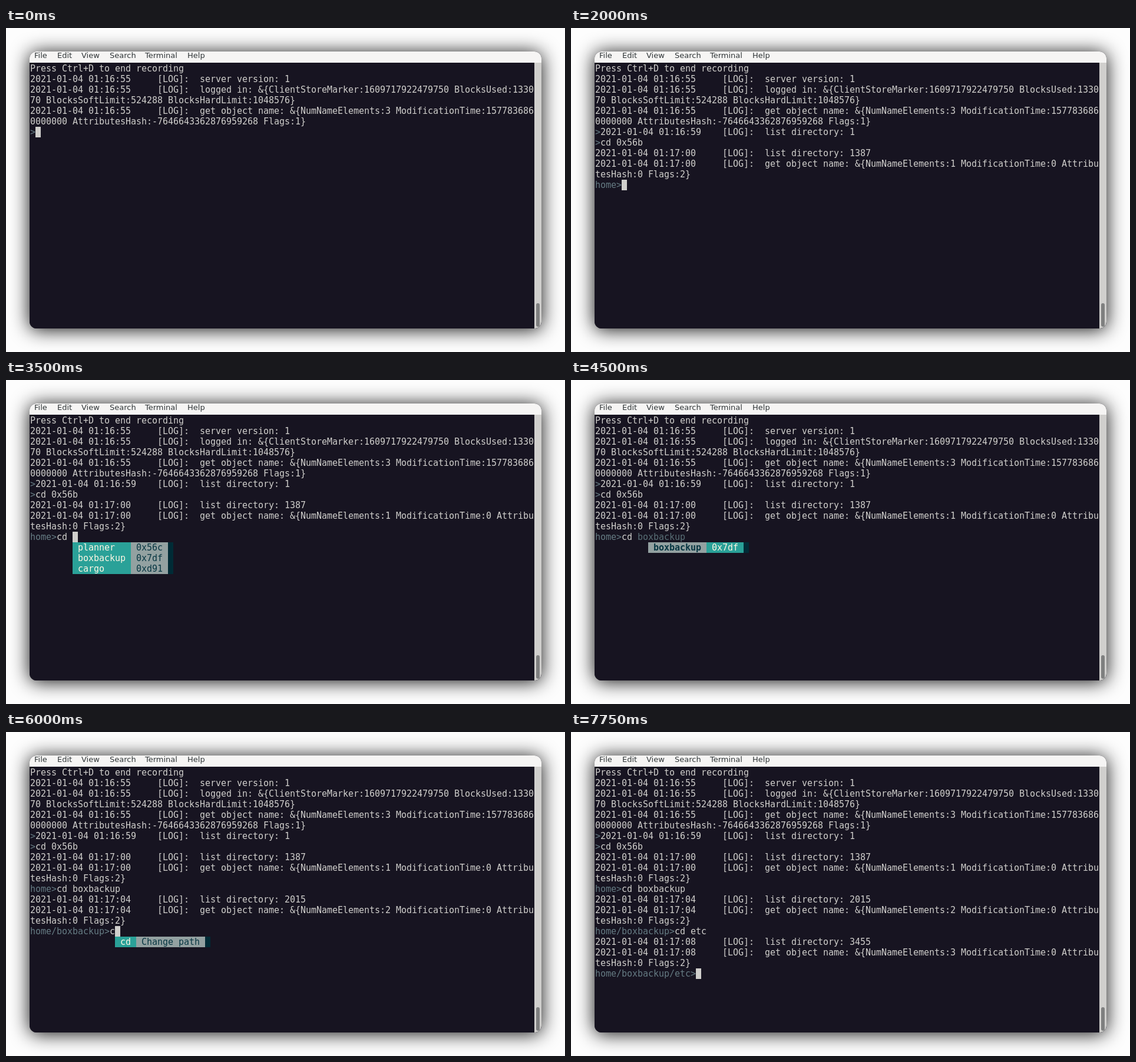
Animation, 949 px wide and 551 px high, one loop 8000 ms. Source, as an HTML page with a canvas:

```html
<!DOCTYPE html>
<html lang="en">
<head>
<meta charset="utf-8">
<title>Terminal session</title>
<style>
  html, body { margin: 0; width: 100%; height: 100%; overflow: hidden; background: #fdfdfd; }
  canvas { display: block; }
</style>
</head>
<body>
<canvas id="stage" width="949" height="551"></canvas>
<script>
const ctx = document.getElementById('stage').getContext('2d');
const STEP = 250, COLS = 95, CELL_W = 9, CELL_H = 18, LEFT = 41, TOP = 60;
const WIN = { x: 40, y: 40, w: 869, h: 471, r: 12 };
const COLOR = {
  page: '#fdfdfd', bar: '#f6f5f4', barText: '#2e3436', back: '#171421', text: '#d0cfcc',
  prompt: '#657b83', preview: '#586e75', teal: '#2aa198', gray: '#93a1a1',
  ink: '#073642', light: '#fdf6e3', edge: '#002b36', track: '#d0cfcd', thumb: '#7f8080'
};

const log = (time, message, prompt = '') => ({
  prompt,
  text: `2021-01-04 ${time}`.padEnd(24 - prompt.length) + '[LOG]:  ' + message
});
const typed = (prompt, text) => ({ prompt, text });
const objectName = (count, time = '0', hash = '0', flags = 2) =>
  `get object name: &{NumNameElements:${count} ModificationTime:${time} AttributesHash:${hash} Flags:${flags}}`;

// Each block is the output that precedes one prompt.
const blocks = [
  [
    typed('', 'Press Ctrl+D to end recording'),
    log('01:16:55', 'server version: 1'),
    log('01:16:55', 'logged in: &{ClientStoreMarker:1609717922479750 BlocksUsed:133070 BlocksSoftLimit:524288 BlocksHardLimit:1048576}'),
    log('01:16:55', objectName(3, '1577836860000000', '-7646643362876959268', 1))
  ],
  [log('01:16:59', 'list directory: 1', '>')],
  [
    typed('>', 'cd 0x56b'),
    log('01:17:00', 'list directory: 1387'),
    log('01:17:00', objectName(1))
  ],
  [
    typed('home>', 'cd boxbackup'),
    log('01:17:04', 'list directory: 2015'),
    log('01:17:04', objectName(2))
  ],
  [
    typed('home/boxbackup>', 'cd etc'),
    log('01:17:08', 'list directory: 3455'),
    log('01:17:08', objectName(3))
  ]
];
const prompts = ['>', '>', 'home>', 'home/boxbackup>', 'home/boxbackup/etc>'];

const commands = [['cd', 'Change path']];
const root = [['0x56b', '0x56b']];
const home = [['planner', '0x56c'], ['boxbackup', '0x7df'], ['cargo', '0xd91']];
const boxes = [home[1]];
const config = [['etc', '0xd7f']];

// One state per step; each digit of blink tells whether the cursor is lit.
const states = [];
function show(block, input, menu, blink = '1', preview = '') {
  for (const lit of blink) states.push({ block, input, menu, preview, lit: lit === '1' });
}
show(0, '', null, '101010');
show(1, 'cd ', root);
show(1, 'cd ', root, '1', '0x56b');
show(2, '', null, '101');
show(2, 'c', commands);
show(2, 'cd ', home, '101');
show(2, 'cd b', boxes);
show(2, 'cd bo', boxes);
show(2, 'cd bo', boxes, '10', 'boxbackup');
show(3, '', null, '10101');
show(3, 'c', commands);
show(3, 'cd ', config, '10');
show(3, 'cd ', config, '10', 'etc');
show(4, '', null, '101');

function box(x, y, w, h, color, radius = 0) {
  ctx.fillStyle = color;
  ctx.beginPath();
  ctx.roundRect(x, y, w, h, radius);
  ctx.fill();
}

function cells(col, row, count, color) {
  box(LEFT + col * CELL_W, TOP + row * CELL_H, count * CELL_W, CELL_H, color);
}

// Writes on the character grid, wrapping at the last column.
function put(col, row, text, color, bold = false) {
  ctx.font = `${bold ? 'bold ' : ''}15px "DejaVu Sans Mono", monospace`;
  ctx.fillStyle = color;
  [...text].forEach((char, i) => {
    const at = col + i;
    ctx.fillText(char, LEFT + at % COLS * CELL_W, TOP + 14 + (row + Math.floor(at / COLS)) * CELL_H);
  });
}

function drawWindow() {
  box(0, 0, 949, 551, COLOR.page);
  ctx.save();
  ctx.shadowColor = 'rgba(0,0,0,0.95)';
  ctx.shadowBlur = 32;
  ctx.shadowOffsetY = 2;
  box(WIN.x, WIN.y, WIN.w, WIN.h, COLOR.back, WIN.r);
  ctx.restore();

  ctx.save();
  ctx.beginPath();
  ctx.roundRect(WIN.x, WIN.y, WIN.w, WIN.h, WIN.r);
  ctx.clip();
  box(40, 40, 869, 19, COLOR.bar);
  box(40, 59, 869, 452, COLOR.back);
  box(897, 59, 12, 452, COLOR.track);
  box(900, 468, 6, 40, COLOR.thumb, 3);
  ctx.restore();

  ctx.font = '13px "DejaVu Sans", sans-serif';
  ctx.fillStyle = COLOR.barText;
  const menuBar = { File: 48, Edit: 87, View: 128, Search: 176, Terminal: 236, Help: 308 };
  for (const [label, x] of Object.entries(menuBar)) ctx.fillText(label, x, 51);
}

function drawMenu(col, row, items, selected) {
  const width = i => Math.max(...items.map(item => item[i].length)) + 2;
  const nameW = width(0), noteW = width(1);
  items.forEach(([name, note], i) => {
    const y = row + i;
    cells(col, y, nameW, selected ? COLOR.gray : COLOR.teal);
    cells(col + nameW, y, noteW, selected ? COLOR.teal : COLOR.gray);
    cells(col + nameW + noteW, y, 1, COLOR.edge);
    put(col + 1, y, name, selected ? COLOR.ink : COLOR.light, selected);
    put(col + nameW + 1, y, note, selected ? COLOR.light : COLOR.ink);
  });
}

function draw({ block, input, menu, preview, lit }) {
  drawWindow();
  let row = 0;
  for (const { prompt, text } of blocks.slice(0, block + 1).flat()) {
    put(0, row, prompt, COLOR.prompt);
    put(prompt.length, row, text, COLOR.text);
    row += Math.ceil((prompt.length + text.length) / COLS);
  }

  const prompt = prompts[block];
  const command = preview ? 'cd ' : input;
  const end = prompt.length + command.length;
  put(0, row, prompt, COLOR.prompt);
  put(prompt.length, row, command, COLOR.text);
  put(end, row, preview, COLOR.preview);
  if (menu) drawMenu(prompt.length + input.length, row + 1, menu, preview !== '');
  if (lit) cells(end + preview.length, row, 1, COLOR.text);
}

const start = performance.now();
let current = -1;
function tick() {
  const index = Math.floor((performance.now() - start) / STEP) % states.length;
  if (index !== current) draw(states[current = index]);
  requestAnimationFrame(tick);
}
tick();
</script>
</body>
</html>
```
